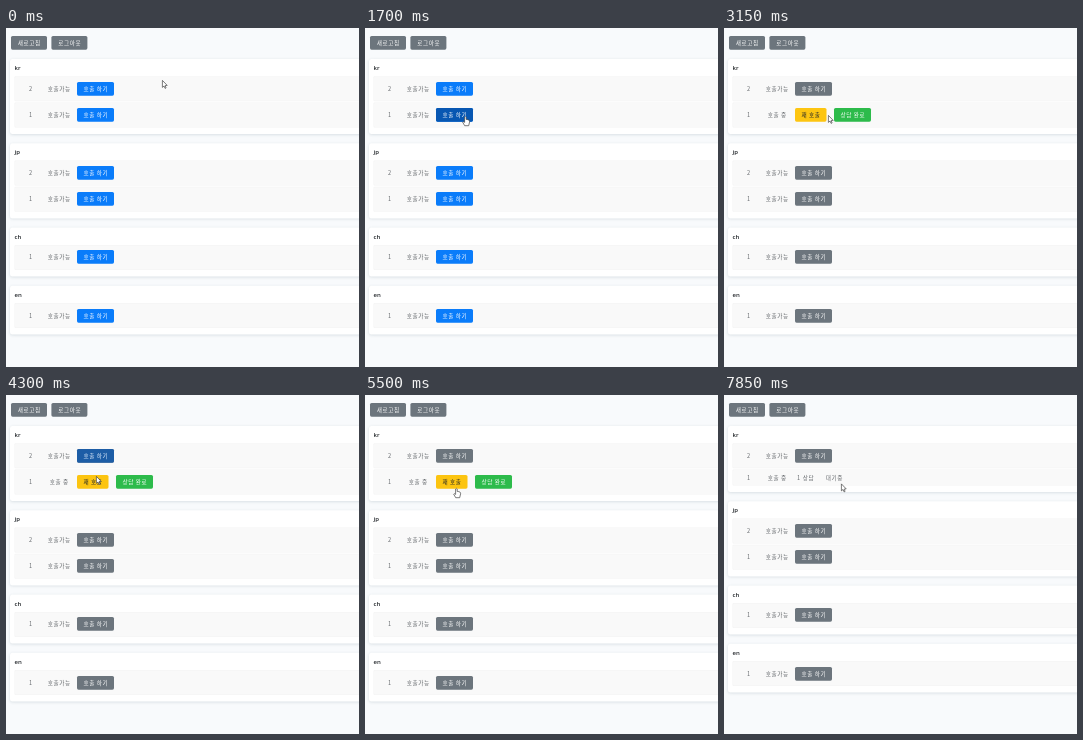
Write an HTML page with a canvas that moves like this. It is 353 by 339 pixels and loops after 8 s.

```html
<!DOCTYPE html>
<html lang="ko">
<head>
<meta charset="utf-8">
<title>호출 목록</title>
<style>
html, body { margin: 0; width: 100%; height: 100%; overflow: hidden; background: #f8fafc; }
canvas { display: block; width: 353px; height: 339px; }
</style>
</head>
<body>
<canvas id="stage"></canvas>
<script>
const W = 353, H = 339, LOOP = 8000, STEP = 50;
const CALLED = 2050, DONE = 7700, FADE = 150, SPEED = 0.3;
const ROW = 25, SHORT_ROW = 16, ROW_GAP = 1.2, CARD_GAP = 9.2, HEAD = 17.3, FOOT = 5.4;
const KR = '"Noto Sans CJK KR", "Noto Sans CJK", sans-serif';
const LATIN = '"Open Sans", sans-serif';

const GRAY = '#6c757d', BLUE = '#0a7cfa', NAVY = '#0857b2';
const YELLOW = '#fdc511', AMBER = '#daa90c';
const GREEN = '#2dbb4b', FOREST = '#218838';
const INK = '#212529', CELL = '#62666a';

const canvas = document.getElementById('stage');
const ctx = canvas.getContext('2d');
const dpr = window.devicePixelRatio || 1;
canvas.width = W * dpr;
canvas.height = H * dpr;

const groups = [['kr', 2], ['jp', 2], ['ch', 1], ['en', 1]];

// The pointer rests at each stop and reaches the next one at its time
const stops = [
  { t: 0, x: 156, y: 52 },
  { t: 1000, x: 100, y: 88 },
  { t: 2700, x: 104, y: 87 },
  { t: 3600, x: 90, y: 64 },
  { t: 4300, x: 90, y: 81 },
  { t: 4700, x: 116, y: 87 },
  { t: 5100, x: 92, y: 98 },
  { t: 5490, x: 91, y: 93 },
  { t: 6400, x: 116, y: 88 },
  { t: 6700, x: 100, y: 88 },
  { t: 7000, x: 108, y: 90 },
  { t: 7300, x: 117, y: 88.5 }
];

const call = { x: 71, w: 37, label: '호출 하기' };
const recall = { x: 71, w: 31.5, label: '재 호출' };
const finish = { x: 110, w: 37, label: '상담 완료' };

const mix = (a, b, k) => a + (b - a) * k;
const ease = u => u * u * (3 - 2 * u);

function pointer(t) {
  const i = stops.findIndex(s => s.t > t);
  if (i < 0) return stops[stops.length - 1];
  const b = stops[i], a = stops[Math.max(0, i - 1)];
  const travel = Math.hypot(b.x - a.x, b.y - a.y) / SPEED;
  const k = ease(Math.max(0, 1 - (b.t - t) / travel) || 0);
  return { x: mix(a.x, b.x, k), y: mix(a.y, b.y, k) };
}

function over(t, b, cy) {
  const { x, y } = pointer(t);
  return x >= b.x && x <= b.x + b.w && Math.abs(y - cy) <= 7;
}

// Eased share of the fade window spent over the button
function hover(t, b, cy) {
  let n = 0;
  for (let i = 0; i < 10; i++) n += over(t - i * FADE / 10, b, cy);
  return ease(n / 10);
}

function box(x, y, w, h, r, fill) {
  ctx.beginPath();
  ctx.roundRect(x, y, w, h, r);
  ctx.fillStyle = fill;
  ctx.fill();
}

function write(s, x, y, color, font) {
  ctx.font = font;
  ctx.fillStyle = color;
  ctx.fillText(s, x, y);
}

function label(s, x, cy, color, weight = 400) {
  ctx.textAlign = 'center';
  ctx.letterSpacing = '0.6px';
  write(s, x + 0.3, cy + 2, color, `${weight} 5.6px ${KR}`);
  ctx.letterSpacing = '0px';
}

function button(b, cy, fill, color = '#fff') {
  box(b.x, Math.round(cy - 7), b.w, 13.7, 1.6, fill);
  label(b.label, b.x + b.w / 2, cy, color, 500);
}

function hoverButton(t, b, cy, fill, dark, color) {
  button(b, cy, fill, color);
  ctx.globalAlpha = hover(t, b, cy);
  button(b, cy, dark, color);
  ctx.globalAlpha = 1;
}

function card(name, y, h) {
  ctx.save();
  ctx.shadowColor = 'rgba(40,70,90,0.16)';
  ctx.shadowBlur = 3 * dpr;
  ctx.shadowOffsetY = 0.7 * dpr;
  box(4, y, W, h, 2.5, '#fff');
  ctx.restore();
  ctx.textAlign = 'left';
  write(name, 8.5, y + 11, INK, `600 6px ${LATIN}`);
}

function row(t, y, h, no, isCalled) {
  const cy = y + h / 2;
  box(8.5, y, W, h, 1, '#f3f3f3');
  box(9, y + 0.5, W, h - 1, 1, '#f9f9f9');
  label(no, 24.5, cy, CELL);
  label(isCalled ? '호출 중' : '호출가능', 53, cy, CELL);
  if (!isCalled) {
    hoverButton(t, call, cy, t < CALLED ? BLUE : GRAY, NAVY);
  } else if (t < DONE) {
    hoverButton(t, recall, cy, YELLOW, AMBER, INK);
    hoverButton(t, finish, cy, GREEN, FOREST);
  } else {
    label('1 상담', 81.3, cy, CELL);
    label('대기중', 110, cy, CELL);
  }
}

function drawGroups(t) {
  let top = 31;
  groups.forEach(([name, count], g) => {
    const rows = [];
    for (let no = count; no > 0; no--) {
      const isCalled = g === 0 && no === 1 && t >= CALLED;
      rows.push({ no, isCalled, h: isCalled && t >= DONE ? SHORT_ROW : ROW });
    }
    const height = rows.reduce((sum, r) => sum + r.h + ROW_GAP, HEAD + FOOT);
    card(name, top, height);
    let y = top + HEAD;
    for (const r of rows) {
      row(t, y, r.h, r.no, r.isCalled);
      y += r.h + ROW_GAP;
    }
    top += height + CARD_GAP;
  });
}

function outline() {
  ctx.closePath();
  ctx.lineWidth = 0.7;
  ctx.lineJoin = 'round';
  ctx.strokeStyle = '#444';
  ctx.fillStyle = '#fff';
  ctx.fill();
  ctx.stroke();
}

function arrow() {
  ctx.beginPath();
  ctx.moveTo(0, 0);
  ctx.lineTo(0, 7);
  ctx.lineTo(1.6, 5.6);
  ctx.lineTo(2.7, 8);
  ctx.lineTo(3.7, 7.5);
  ctx.lineTo(2.7, 5.2);
  ctx.lineTo(4.8, 5);
  outline();
}

function hand() {
  ctx.beginPath();
  ctx.moveTo(-0.8, 0.6);
  ctx.quadraticCurveTo(0, -0.7, 0.8, 0.6);
  ctx.lineTo(0.8, 3);
  ctx.quadraticCurveTo(4.6, 3.2, 4.2, 5.4);
  ctx.lineTo(3.3, 9.3);
  ctx.lineTo(-0.7, 9.3);
  ctx.lineTo(-2.7, 5.8);
  ctx.quadraticCurveTo(-2.4, 4.6, -0.8, 6);
  outline();
}

function drawPointer(t) {
  const { x, y } = pointer(t);
  const targets = t < CALLED ? [call] : t < DONE ? [recall, finish] : [];
  ctx.save();
  ctx.translate(x + 0.4, y + 0.4);
  if (targets.some(b => over(t - 10, b, 87))) hand();
  else arrow();
  ctx.restore();
}

function draw(t) {
  ctx.setTransform(dpr, 0, 0, dpr, 0, 0);
  ctx.fillStyle = '#f8fafc';
  ctx.fillRect(0, 0, W, H);
  ['새로고침', '로그아웃'].forEach((s, i) =>
    button({ x: 5 + 40.4 * i, w: 36, label: s }, 15, GRAY));
  drawGroups(t);
  drawPointer(t);
}

const start = performance.now();
function tick() {
  const t = (performance.now() - start) % LOOP;
  draw(Math.floor(t / STEP) * STEP);
  requestAnimationFrame(tick);
}
tick();
</script>
</body>
</html>
```
